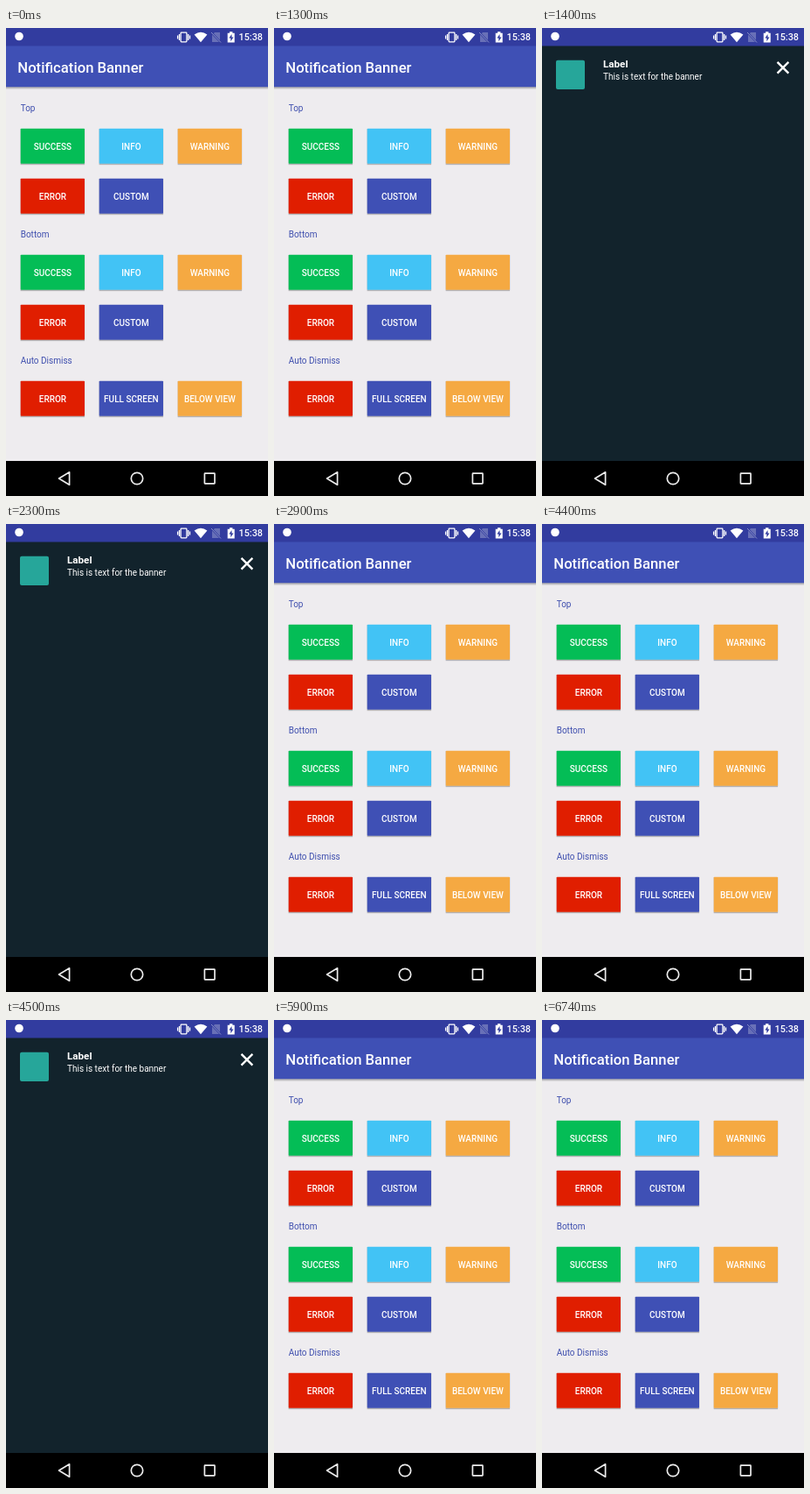
These frames come from a looping animation (300 by 534 pixels, 7300 ms). An HTML page:

```html
<!DOCTYPE html>
<html lang="en">
<head>
<meta charset="utf-8">
<title>Notification Banner</title>
<style>
  html, body { margin: 0; width: 100%; height: 100%; overflow: hidden; background: #000; }
  svg { display: block; width: 100%; height: 100%; font-family: Roboto, sans-serif; }
  .button { font-size: 10px; font-weight: 500; fill: #fff; text-anchor: middle; }
  .section { font-size: 10px; fill: #3f4fae; }
</style>
</head>
<body>
<svg viewBox="0 0 300 534">
  <defs>
    <linearGradient id="shade" x2="0" y2="1">
      <stop offset="0" stop-color="#000" stop-opacity=".32"/>
      <stop offset="1" stop-color="#000" stop-opacity="0"/>
    </linearGradient>
  </defs>

  <g id="screen">
    <rect y="20" width="300" height="474" fill="#eeecef"/>
    <rect y="20" width="300" height="47.3" fill="#3f50b5"/>
    <rect y="67.3" width="300" height="3" fill="url(#shade)"/>
    <text x="13.3" y="51" font-size="16.67" font-weight="500" fill="#fff">Notification Banner</text>
    <g id="content"></g>
  </g>

  <g id="banner" visibility="hidden">
    <rect y="20" width="300" height="474" fill="#12232c"/>
    <rect x="16" y="36.8" width="33" height="33.2" rx="2" fill="#26a69a"/>
    <text x="70" y="45" font-size="11.67" font-weight="700" fill="#fff">Label</text>
    <text x="70" y="59.3" font-size="10" fill="#fff">This is text for the banner</text>
    <path d="M269.5 38.8l12.8 12.8m0-12.8l-12.8 12.8" stroke="#fff" stroke-width="2.4"/>
  </g>

  <g id="status" fill="#fff">
    <rect width="300" height="20.5" fill="#323c9f"/>
    <circle cx="15" cy="9.5" r="4.8"/>
    <g fill="none" stroke="#fff" stroke-width="1.3">
      <rect x="200.1" y="5.2" width="6.8" height="10.6" rx=".8"/>
      <path d="M198.5 7v7M196.6 8.5v4M208.6 7v7M210.5 8.5v4"/>
    </g>
    <path d="M215.6 7.6Q223 2 230.4 7.6L223 16.2z"/>
    <path d="M239 5h6v11h-9v-8z" fill="#6870b7"/>
    <path d="M235 5l11 11.5" stroke="#323c9f" stroke-width="2.2"/>
    <path d="M235 5l11 11.5" stroke="#8a90c8" stroke-width="1"/>
    <path d="M256 4.3h3.4v1.4h2.3v10.8h-8v-10.8h2.3z"/>
    <path d="M258.5 7l-3.2 4.6h2v3.6l3.2-4.8h-2z" fill="#323c9f"/>
    <text x="294" y="14.4" font-size="10.8" font-weight="500" text-anchor="end">15:38</text>
  </g>

  <g id="navigation" fill="none" stroke="#ececec" stroke-width="1.7">
    <rect y="494" width="300" height="40" fill="#000" stroke="none"/>
    <path d="M60.6 514l12-7.2v14.4z" stroke-linejoin="round"/>
    <circle cx="150" cy="514" r="6.7"/>
    <rect x="227.4" y="508.2" width="11.6" height="11.6" rx=".5"/>
  </g>
</svg>
<script>
  const LOOP = 7300;
  const BANNER_TIMES = [[1400, 2900], [4500, 5900]];
  const COLORS = {
    green: '#04bd56', blue: '#42c3f5', orange: '#f5a942', red: '#e01e00', indigo: '#3f50b5'
  };
  const basicRows = [
    [['SUCCESS', 'green'], ['INFO', 'blue'], ['WARNING', 'orange']],
    [['ERROR', 'red'], ['CUSTOM', 'indigo']]
  ];
  const sections = [
    { title: 'Top', y: 95.2, rows: basicRows },
    { title: 'Bottom', y: 239.2, rows: basicRows },
    { title: 'Auto Dismiss', y: 383.2,
      rows: [[['ERROR', 'red'], ['FULL SCREEN', 'indigo'], ['BELOW VIEW', 'orange']]] }
  ];

  function button([label, color], x, y) {
    return `<rect x="${x - .4}" y="${y + .4}" width="74.1" height="40.2" fill="#000" opacity=".12"/>
      <rect x="${x}" y="${y + 40}" width="73.3" height="2" fill="url(#shade)"/>
      <rect x="${x}" y="${y}" width="73.3" height="40" rx=".8" fill="${COLORS[color]}"/>
      <text class="button" x="${x + 36.7}" y="${y + 23.7}">${label}</text>`;
  }

  function section({ title, y, rows }) {
    const buttons = rows.flatMap((row, r) =>
      row.map((item, c) => button(item, 16.7 + 90 * c, y + 19.6 + 57 * r)));
    return `<text class="section" x="16.7" y="${y}">${title}</text>${buttons.join('')}`;
  }

  document.getElementById('content').innerHTML = sections.map(section).join('');
  const banner = document.getElementById('banner');
  const start = performance.now();

  function draw() {
    const time = (performance.now() - start) % LOOP;
    const shown = BANNER_TIMES.some(([from, to]) => time >= from && time < to);
    banner.setAttribute('visibility', shown ? 'visible' : 'hidden');
    requestAnimationFrame(draw);
  }
  draw();
</script>
</body>
</html>
```
